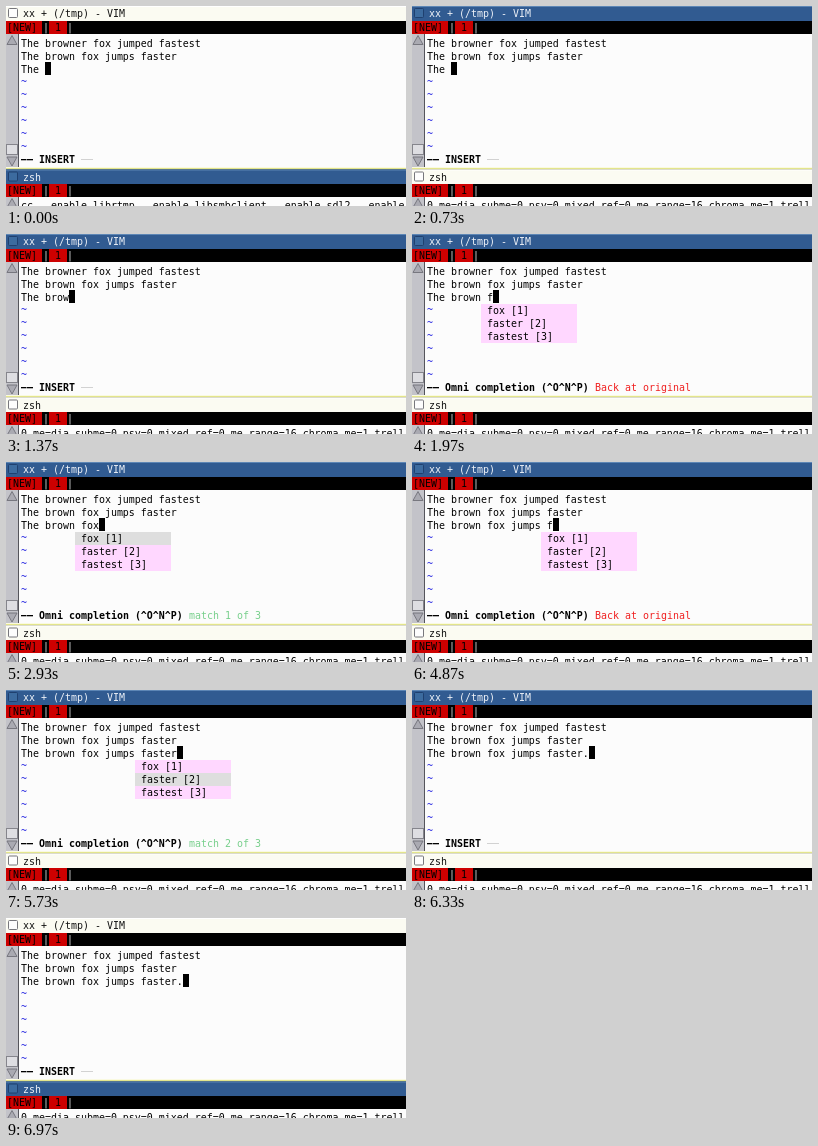
Animation of 400x200 px, one loop 7010 ms. Source, as an HTML page:

```html
<!DOCTYPE html>
<html lang="en">
<head>
<meta charset="utf-8">
<title>Omni completion</title>
<style>
  html, body { margin: 0; width: 100%; height: 100%; overflow: hidden; background: #000; }
  svg { display: block; width: 400px; height: 200px; }
  text { font: 9.967px "DejaVu Sans Mono", monospace; white-space: pre; }
  .bold { font-weight: bold; }
</style>
</head>
<body>
<svg id="stage" viewBox="0 0 400 200"></svg>
<script>
const LOOP = 7010, COL = 6, ROW = 13, LEFT = 15, TOP = 31;
const stage = document.getElementById('stage');

function add(tag, attrs, content = '') {
  const node = document.createElementNS('http://www.w3.org/2000/svg', tag);
  for (const key in attrs) node.setAttribute(key, attrs[key]);
  node.textContent = content;
  stage.append(node);
  return node;
}
const rect = (x, y, width, height, fill, extra) => add('rect', { x, y, width, height, fill, ...extra });
const label = (x, y, content, fill = '#000', extra) => add('text', { x, y, fill, ...extra }, content);
const path = (d, fill, stroke = 'none') => add('path', { d, fill, stroke });
const rowY = row => TOP + row * ROW;
const baseline = row => rowY(row) + 10;
const show = (node, on) => node.setAttribute('visibility', on ? 'visible' : 'hidden');

function titleBar(y, height, title) {
  const bar = rect(0, y, 400, height, '#fff');
  const edge = rect(0, y, 400, 1, '#fff');
  const icon = rect(2.5, y + 2.5, 9, 9, '#fff', { rx: 1 });
  const text = label(17, y + 11, title);
  return focused => {
    bar.setAttribute('fill', focused ? '#315b91' : '#fbfbf2');
    edge.setAttribute('fill', focused ? '#5d86b5' : '#ffffff');
    icon.setAttribute('fill', focused ? '#3c6b9f' : '#fdfdfd');
    icon.setAttribute('stroke', focused ? '#1f406f' : '#77777c');
    text.setAttribute('fill', focused ? '#eef2f8' : '#111');
  };
}

function tabBar(y) {
  rect(0, y, 400, ROW, '#000');
  rect(0, y, 36, ROW, '#cd0000');
  rect(43, y, 18, ROW, '#cd0000');
  label(1, y + 10, '[NEW]');
  label(37, y + 10, '|', '#ddd');
  label(49, y + 10, '1');
  label(61, y + 10, '|', '#ddd');
}

function scrollBar(y, height) {
  rect(0, y, 12, height, '#c3c3c9');
  rect(12, y, 1, height, '#55555c');
  path(`M6 ${y + 1.5}L11 ${y + 10.5}H1Z`, '#aaaab2', '#77777f');
}

const focusTop = titleBar(0, 15, 'xx + (/tmp) - VIM');
tabBar(15);
rect(0, 28, 400, 134, '#fcfcfc');
scrollBar(28, 133);
rect(0.5, 138.5, 11, 10, '#dedee2', { stroke: '#85858c' });
path('M6 160L11 151H1Z', '#aaaab2', '#77777f');
rect(0, 161, 400, 1, '#fafae0');
rect(0, 162, 400, 1.5, '#e3e58c');
const focusBottom = titleBar(163.5, 14.5, 'zsh');
tabBar(178);
rect(0, 191, 400, 9, '#fcfcfc');
scrollBar(191, 9);
const shellLine = label(LEFT, 203, '');

label(LEFT, baseline(0), 'The browner fox jumped fastest');
label(LEFT, baseline(1), 'The brown fox jumps faster');
for (let row = 3; row < 9; row++) label(LEFT, baseline(row) - 1, '~', '#2222e0');
const typed = label(LEFT, baseline(2), '');
const cursor = rect(0, rowY(2) - 1, COL, ROW, '#000');

const choices = ['fox', 'faster', 'fastest'];
const menu = choices.map((word, i) => ({
  box: rect(0, rowY(3 + i), 16 * COL, ROW, '#ffd7ff'),
  text: label(0, baseline(3 + i), `${word} [${i + 1}]`)
}));

rect(LEFT, 153, 5.5, 1.3, '#000');
rect(LEFT + COL, 153, 6, 1.3, '#000');
const mode = label(LEFT + 3 * COL, baseline(9) - 1, '', '#000', { class: 'bold' });
const dashes = rect(75, 153, 12, 1, '#d2d2d2');
const message = label(LEFT + 28 * COL, baseline(9) - 1, '');

const FOX = 10, FAST = 20;
// Each step: time, typed line, menu column, selected choice (-1 for none)
const steps = [[0, 'The ']];
function type(start, gap, before, addition) {
  for (let i = 1; i <= addition.length; i++)
    steps.push([start + (i - 1) * gap, before + addition.slice(0, i)]);
}
type(930, 120, 'The ', 'brown f');
steps.push([1850, 'The brown f', FOX, -1], [2470, 'The brown fox', FOX, 0]);
type(3130, 125, 'The brown fox', ' jumps ');
type(4230, 100, 'The brown fox jumps ', 'f');
steps.push(
  [4530, 'The brown fox jumps f', FAST, -1],
  [4930, 'The brown fox jumps fox', FAST, 0],
  [5330, 'The brown fox jumps faster', FAST, 1],
  [6070, 'The brown fox jumps faster.']
);

function draw(time) {
  const [, line, column, selected] = steps.findLast(step => step[0] <= time);
  const open = column !== undefined;
  const topActive = time >= 430 && time < 6600;
  focusTop(topActive);
  focusBottom(!topActive);
  shellLine.textContent = time < 100
    ? 'cc --enable-librtmp --enable-libsmbclient --enable-sdl2 --enable-'
    : '0 me=dia subme=0 psy=0 mixed_ref=0 me_range=16 chroma_me=1 trell';
  typed.textContent = line;
  cursor.setAttribute('x', LEFT + line.length * COL);
  menu.forEach(({ box, text }, i) => {
    show(box, open);
    show(text, open);
    if (!open) return;
    const x = LEFT + column * COL;
    box.setAttribute('x', x - COL);
    box.setAttribute('fill', i === selected ? '#dedede' : '#ffd7ff');
    text.setAttribute('x', x);
  });
  mode.textContent = open ? 'Omni completion (^O^N^P)' : 'INSERT';
  show(dashes, !open);
  message.textContent = !open ? '' : selected < 0 ? 'Back at original' : `match ${selected + 1} of 3`;
  message.setAttribute('fill', selected < 0 ? '#f02020' : '#78cf8c');
}

const start = performance.now();
function tick() {
  draw((performance.now() - start) % LOOP);
  requestAnimationFrame(tick);
}
tick();
</script>
</body>
</html>
```
